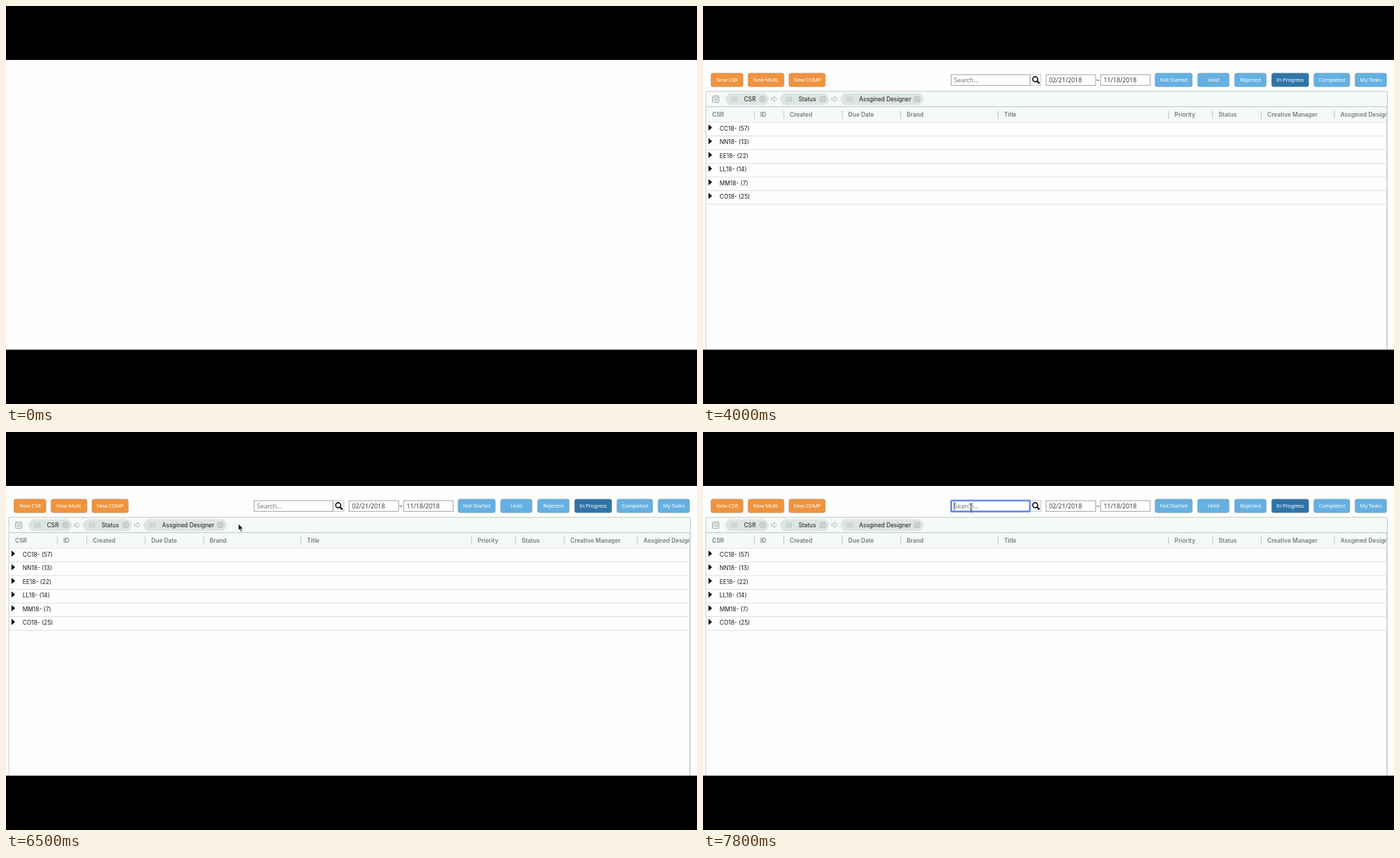
An HTML page for the animation above (8 s loop, 987 by 568 pixels).

```html
<!DOCTYPE html>
<html lang="en">
<head>
<meta charset="utf-8">
<title>Task grid</title>
<style>
  html, body { margin: 0; width: 100%; height: 100%; overflow: hidden; background: #000; }
  svg { display: block; }
  text { white-space: pre; }
  .grid { font: 400 8.35px Inter, sans-serif; fill: #161818; }
  .head { font: 600 8.35px Inter, sans-serif; }
  .btn { font: 400 7.8px "Noto Sans", sans-serif; letter-spacing: -.28px; fill: #fff; text-anchor: middle; }
  .field { font: 400 8.85px "Noto Sans", sans-serif; fill: #3c3c3c; }
</style>
</head>
<body>
<svg id="stage" width="987" height="568" viewBox="0 0 987 568"></svg>
<script>
const stage = document.getElementById('stage');

function add(parent, tag, attrs = {}, text) {
  const node = document.createElementNS('http://www.w3.org/2000/svg', tag);
  for (const key in attrs) node.setAttribute(key, attrs[key]);
  if (text) node.textContent = text;
  return parent.appendChild(node);
}
const group = parent => add(parent, 'g');
const rect = (g, x, y, x2, y2, fill, more) =>
  add(g, 'rect', { x, y, width: x2 - x, height: y2 - y, fill, ...more });
const path = (g, d, stroke, width = 1, fill = 'none') =>
  add(g, 'path', { d, stroke, 'stroke-width': width, fill });
const label = (g, x, y, text, cls, more) => add(g, 'text', { x, y, class: cls, ...more }, text);
const show = (node, on) => node.setAttribute('display', on ? 'inline' : 'none');

rect(stage, 0, 0, 987, 568, '#000');
rect(stage, 0, 77, 987, 490.5, '#fefefd');
const clip = add(stage, 'clipPath', { id: 'inside' });
rect(clip, 4, 120, 976.5, 490);

const columns = [['CSR', 13], ['ID', 82], ['Created', 124], ['Due Date', 207.5], ['Brand', 291],
  ['Title', 430], ['Priority', 673.5], ['Status', 736.5], ['Creative Manager', 806],
  ['Assgined Designer', 910.5]];

function header(parent, back, ink, line) {
  const g = group(parent);
  g.setAttribute('clip-path', 'url(#inside)');
  rect(g, 4, 144, 977, 166, back);
  columns.forEach(([name, x], i) => {
    label(g, x, 158, name, 'head', { fill: ink });
    if (i) path(g, `M${x - 8.6} 149.5V161`, line);
  });
  return g;
}

function chip(g, x, x2, textX, name) {
  rect(g, x, 124.5, x2, 141.5, '#dde5e2', { rx: 8.5 });
  for (let c = 0; c < 4; c++)
    path(g, `M${x + 9.2 + c * 2.4} 129.8V136.6`, '#a3adaa', 1).setAttribute('stroke-dasharray', '1.1 .8');
  label(g, textX, 135.9, name, 'grid');
  const cx = x2 - 9;
  add(g, 'circle', { cx, cy: 132.8, r: 4, fill: 'none', stroke: '#98a3a0', 'stroke-width': .8 });
  path(g, `M${cx - 2} 130.8l4 4m0-4l-4 4`, '#98a3a0', .8);
}

// Grid
const grid = group(stage);
rect(grid, 4, 121.5, 977.5, 144, '#f5faf6');
const loadHead = header(grid, '#f9f9fe', '#b7b7ba', '#c4c4ca');
const readyHead = header(grid, '#f5faf6', '#777d7a', '#bcc3c0');
path(grid, 'M4 166H977', '#e2e5e6');
path(grid, 'M4 490V121.8H977.5V144', '#c3c8c8');
path(grid, 'M4 143.7H977', '#bfc4c5');
path(grid, 'M977 144V490', '#b5b5bf', 1.2);

rect(grid, 13.5, 128.3, 22.8, 137.5, 'none', { rx: 1.5, stroke: '#96a19e', 'stroke-width': .9 });
path(grid, 'M13.5 130.3H22.8M15.5 132.5v2.7M17.5 132.5v2.7M17.5 132.6h3M18 135h2.5M20.6 132.5v2.7', '#96a19e', .8);
chip(grid, 32, 94, 58.5, 'CSR');
chip(grid, 110, 180, 136.5, 'Status');
chip(grid, 196.4, 315, 223, 'Assgined Designer');
for (const x of [97.5, 183.7])
  path(grid, `M${x} 131.4h4v-2.4l4.4 3.7l-4.4 3.7v-2.4h-4z`, '#a5afac', .8);

// Loading notice
const loading = group(stage);
rect(loading, 460, 394, 522, 428.2, '#dcdcdc', { rx: 1 });
rect(loading, 459.5, 393.5, 521.2, 427.2, '#fefefd', { rx: 1, stroke: '#c3c3c5', 'stroke-width': 1 });
label(loading, 490.3, 413.5, 'Loading...', 'grid', { 'text-anchor': 'middle' });

// Grouped rows
const rows = group(stage);
['CC18- (57)', 'NN18- (13)', 'EE18- (22)', 'LL18- (14)', 'MM18- (7)', 'CO18- (25)'].forEach((name, i) => {
  const y = 166 + i * 19.5;
  path(rows, `M7.8 ${y + 3}l5.2 4.5l-5.2 4.5z`, 'none', 0, '#111');
  label(rows, 23.8, y + 11.6, name, 'grid');
  path(rows, `M4.5 ${y + 19.5}H976.5`, '#dadedd');
});

// Toolbar
const bar = group(stage);
function button(g, x, x2, name, fill) {
  rect(g, x, 95.7, x2, 115.3, fill, { rx: 3, stroke: '#8a929a', 'stroke-opacity': .45, 'stroke-width': .8 });
  label(g, (x + x2) / 2, 108.4, name, 'btn');
}
function field(x, x2, text, ink) {
  rect(bar, x, 98, x2, 113.3, '#fff', { stroke: '#a2a2a2', 'stroke-width': 1 });
  label(bar, x + 4.2, 109.1, text, 'field', ink && { style: `fill:${ink}` });
}
const orange = '#f0933d', blue = '#65b0e2';
button(bar, 11.2, 57.3, 'New CSR', orange);
button(bar, 64.2, 115.8, 'New Multi.', orange);
button(bar, 122.7, 174.8, 'New COMP', orange);
const filters = group(bar);
button(filters, 646, 699.4, 'Not Started', blue);
button(filters, 706.7, 752, 'Hold', blue);
button(filters, 759.6, 805, 'Rejected', blue);
button(filters, 812.5, 865.7, 'In Progress', '#2f74a8');
button(filters, 872.9, 924.3, 'Completed', blue);
button(filters, 931.6, 977, 'My Tasks', blue);

rect(bar, 467.5, 97.7, 482.7, 113.3, '#fafafa', { stroke: '#c4c4c4', 'stroke-width': .9 });
field(354.4, 467, 'Search...', '#757575');
add(bar, 'circle', { cx: 474.5, cy: 104.5, r: 3.6, fill: 'none', stroke: '#111', 'stroke-width': 1.6 });
path(bar, 'M477.2 107.2L480.6 110.6', '#111', 2.3);
field(490, 560.8, '02/21/2018');
label(bar, 561.6, 108.6, '~', 'field');
field(568, 638.8, '11/18/2018');

const focus = group(bar);
rect(focus, 354.4, 97.8, 467, 113.5, 'none', { rx: 1, stroke: '#a9bdf5', 'stroke-width': 3 });
rect(focus, 354.6, 98, 466.8, 113.3, 'none', { rx: .5, stroke: '#5a80e8', 'stroke-width': 1.7 });
const caret = path(bar, 'M358.7 100V111.6', '#222', .9);

// Mouse
const arrow = path(stage, 'M0 0V9.6L2.2 7.6L3.9 11.5L5.5 10.8L3.8 7H6.9Z', '#fff', .7, '#111');
const beam = group(stage);
const beamLine = 'M-2.4 -6.2Q0 -6.2 0 -4.8Q0 -6.2 2.4 -6.2M0 -5V5M-2.4 6.2Q0 6.2 0 4.8Q0 6.2 2.4 6.2M-1.3 2.4H1.3';
path(beam, beamLine, '#fff', 1.8).setAttribute('opacity', .6);
path(beam, beamLine, '#222', .9);

// Pointer position every 100 ms from 6000 ms on
const track = [[343, 113], [318, 132], [303, 146], [299.5, 149.5], [308, 145], [332, 131], [356, 118],
  [376, 111], [381.2, 110], [382, 109.4], [382.6, 108.7], [383, 108.3]];

function draw(t) {
  const step = Math.floor((t - 6000) / 100);
  const ready = t >= 4000;
  show(grid, t >= 300);
  show(bar, t >= 400);
  show(loading, t >= 300 && !ready);
  show(loadHead, !ready);
  show(readyHead, ready);
  show(rows, ready);
  filters.setAttribute('transform', `translate(${ready ? -.4 : 0} 0)`);
  show(focus, t >= 6800);
  show(caret, t >= 6800 && Math.floor((t - 6800) / 500) % 2 === 0);

  const [x, y] = track[Math.max(0, Math.min(step, track.length - 1))];
  const overField = x > 354 && y < 114;
  for (const node of [arrow, beam]) node.setAttribute('transform', `translate(${x} ${y})`);
  show(arrow, step >= 0 && !overField);
  show(beam, step >= 0 && overField);
}

const start = performance.now();
function tick() {
  draw((performance.now() - start) % 8000);
  requestAnimationFrame(tick);
}
tick();
</script>
</body>
</html>
```
